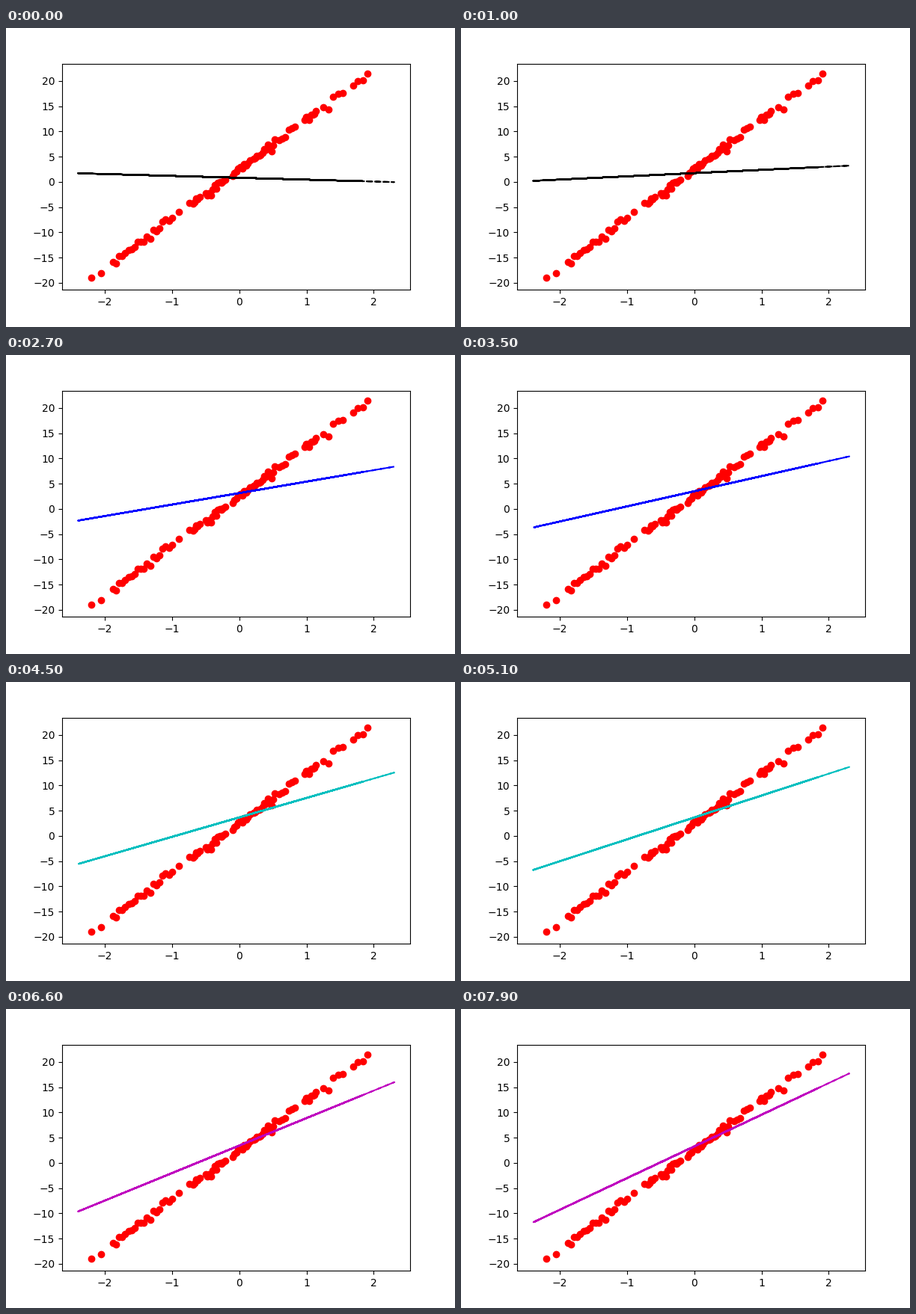
A matplotlib script for the animation above (8000 ms loop, 600 px wide and 400 px high).

```python
import matplotlib.pyplot as plt
import numpy as np
from matplotlib.animation import FuncAnimation
from numpy.polynomial import Polynomial

FRAMES, INTERVAL = 80, 100
COLORS = "kbcm"  # one colour per quarter of the loop

rng = np.random.default_rng(4)


def through(*points):
    """Smooth curve through a few (step, value) points."""
    steps, values = zip(*points)
    return Polynomial.fit(steps, values, len(points) - 1)


slope = through((0, -.372), (27, 2.275), (54, 4.575), (79, 6.28))
offset = through((0, .807), (19, 2.555), (35, 3.485), (50, 3.65),
                 (66, 3.42), (79, 3.25))

# Unsorted inputs: the dashed line runs back and forth over itself
line_x = np.clip(rng.normal(0, 1, 100), -2.1, 1.84)
line_x[::20] = rng.uniform(-2.398, -2.36, 5)
line_x[41], line_x[55] = -2.398, 2.305

# Noisy samples along a straight trend, in runs of (first x, last x, count)
RUNS = [(-2.2, -2.06, 2), (-1.88, -1, 20), (-.9, -.74, 2), (-.69, -.59, 5),
        (-.5, -.21, 12), (-.1, .16, 10), (.21, .53, 13), (.59, .83, 6),
        (.97, 1.14, 8), (1.25, 1.54, 5), (1.69, 1.91, 4)]
sample_x = np.concatenate([np.linspace(*run) for run in RUNS])
sample_y = 9.88 * sample_x + 2.5 + rng.normal(0, .4, sample_x.size)

fig = plt.figure(figsize=(6, 4), dpi=100, facecolor="white")
ax = fig.add_axes([0.125, 0.125, 0.775, 0.755])
ax.set_xlim(-2.633, 2.54)
ax.set_ylim(-21.36, 23.38)
ax.set_xticks(range(-2, 3))
ax.set_yticks(range(-20, 21, 5))
ax.plot(sample_x, sample_y, "ro")
line, = ax.plot([], [], "--", lw=1.5)


def update(i):
    line.set_data(line_x, slope(i) * line_x + offset(i))
    line.set_color(COLORS[i * len(COLORS) // FRAMES])
    return line,


anim = FuncAnimation(fig, update, frames=FRAMES, interval=INTERVAL,
                     repeat=True, repeat_delay=0)
plt.show()
```
